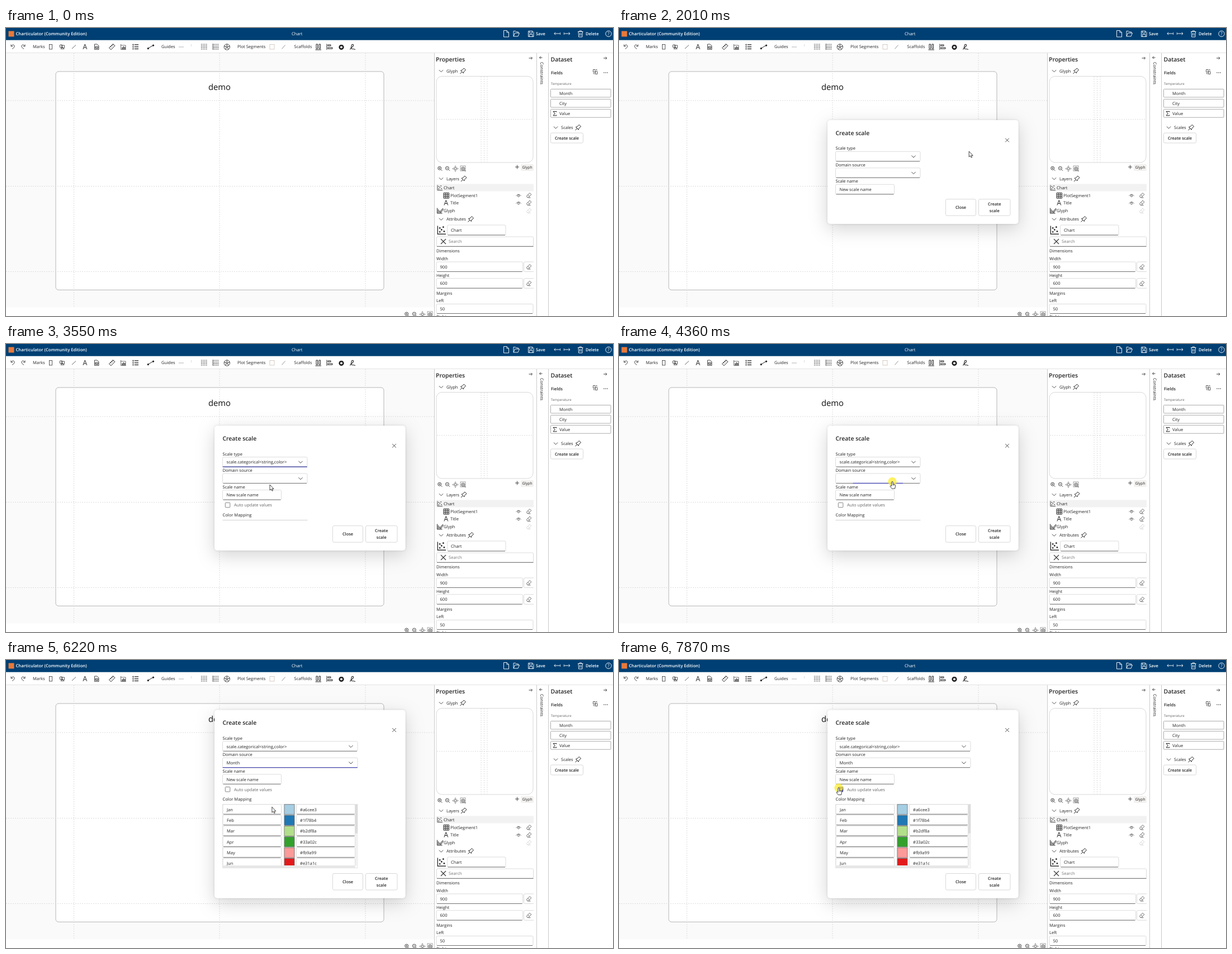
These frames come from a looping animation (1086x516 px, 8000 ms). An HTML page:

```html
<!DOCTYPE html>
<html lang="en">
<head>
<meta charset="utf-8">
<title>Chart</title>
<style>
html, body { margin: 0; width: 100%; height: 100%; overflow: hidden; background: #fff; }
svg { display: block; width: 1086px; height: 516px; font-family: "Open Sans", "Noto Sans", sans-serif; }
text { fill: #242424; white-space: pre; text-rendering: geometricPrecision; }
path, circle, rect { vector-effect: none; }
.panel { filter: drop-shadow(0 0 2px rgba(0,0,0,.13)) drop-shadow(0 9px 16px rgba(0,0,0,.17)); }
.list { filter: drop-shadow(0 0 1px rgba(0,0,0,.14)) drop-shadow(0 3px 4px rgba(0,0,0,.16)); }
</style>
</head>
<body>
<svg viewBox="0 0 1086 516"><g id="base"></g><g id="live"></g></svg>
<script>
const BLUE = '#4f52b8', INK = '#333';

// y is the middle of the capitals
const text = (x, y, s, { size = 7.55, weight = 400, fill = '#242424', anchor = 'start' } = {}) =>
  `<text x="${x}" y="${y + size * .36}" font-size="${size}" font-weight="${weight}" text-anchor="${anchor}" style="fill:${fill}">${s}</text>`;
const rect = (x, y, w, h, fill = 'none', stroke = 'none', r = 0, extra = '') =>
  `<rect x="${x}" y="${y}" width="${w}" height="${h}" rx="${r}" fill="${fill}" stroke="${stroke}" stroke-width=".8" ${extra}/>`;
const path = (d, stroke = INK, w = .9, fill = 'none', extra = '') =>
  `<path d="${d}" stroke="${stroke}" stroke-width="${w}" fill="${fill}" ${extra}/>`;
const circle = (x, y, r, stroke = INK, fill = 'none') =>
  `<circle cx="${x}" cy="${y}" r="${r}" stroke="${stroke}" stroke-width=".9" fill="${fill}"/>`;
const at = (x, y, s) => `<g transform="translate(${x} ${y})">${s}</g>`;
const seq = (n, f) => Array.from({ length: n }, (_, i) => f(i)).join('');
const dashed = d => path(d, '#d9d9d9', .9, 'none', 'stroke-dasharray="2 2"');

const field = (x, y, w, h = 17.5) =>
  rect(x, y, w, h, '#fff', '#d4d4d4', 2) + path(`M${x + 1} ${y + h}h${w - 2}`, '#666', .9);
const chevron = (x, y, w = 3.6) => path(`M${x - w} ${y - w / 2}l${w} ${w}l${w} ${-w}`);
const cross = (x, y, r, w = .9) => path(`M${x - r} ${y - r}l${2 * r} ${2 * r}m0 ${-2 * r}l${-2 * r} ${2 * r}`, INK, w);
const arrow = (x, y, dir, len = 6, color = INK) =>
  path(`M${x - dir * len / 2} ${y}h${dir * len}m${-dir * 2.3} -2.3l${dir * 2.3} 2.3l${-dir * 2.3} 2.3`, color);
const pin = (x, y) => at(x, y, path('M-5 5l3.4-3.4M-4-.8l4.8 4.8L1.6 1.3L5-1.8L1.8-5L-1.3-1.6z', '#222', 1));
const eraser = (x, y, color = '#444') =>
  at(x, y, path('M-4 1L1.5-4.5L4.3-1.7L-1 3.8h-1.7zM-2-1l3.2 3M-1 4h4', color, .8));
const eye = (x, y) => path(`M${x - 4.5} ${y + 1}q4.5-6 9 0`, '#555', .8) + circle(x, y + .8, 1.7, '#555');
const lens = (x, y, mark) => circle(x - .8, y - .8, 3) + path(`M${x + 1.5} ${y + 1.5}l2.5 2.5M${x - 2.3} ${y - .8}h3${mark}`, INK, .8);
const zoomBar = (x, y) => lens(x, y, 'm-1.5-1.5v3') + lens(x + 13.7, y, '') +
  at(x + 27.5, y, circle(0, 0, 2.2) + path('M-3.5-1.5L-5 0l1.5 1.5M3.5-1.5L5 0L3.5 1.5M-1.5-3.5L0-5l1.5 1.5M-1.5 3.5L0 5l1.5-1.5', INK, .7)) +
  rect(x + 36.5, y - 5, 9, 9, 'none', '#888') + lens(x + 42, y + 1, 'm-1.5-1.5v3');
const scatter = (x, y, s) => at(x, y, `<g transform="scale(${s})">` + path('M.5 0v9.5h9.5') +
  [[3, 2.5], [7, 1.5], [5, 4.5], [3, 7], [8, 6.5]].map(p => circle(...p, .5, INK, INK)).join('') + '</g>');
const letterA = (x, y) => path(`M${x - 3.4} ${y + 4.5}l3.4-9l3.4 9m-1.2-3h-4.4`, '#222', 1);
const section = (x, y, label, pinX) => chevron(x, y) + text(x + 9.5, y, label) + pin(pinX, y);
const button = (x, y, w, h, lines, fill = '#fff') => rect(x, y, w, h, fill, '#cfcfcf', 2.5) +
  lines.map((s, i) => text(x + w / 2, y + h / 2 + (i - (lines.length - 1) / 2) * 11.6, s, { size: 7.4, weight: 600, anchor: 'middle' })).join('');

function header() {
  const W = { fill: '#fff' }, B = { fill: '#fff', weight: 600, size: 7.5 };
  return rect(0, 0, 1086, 21.7, '#003f73') + rect(4.5, 5.5, 10, 10, '#e8793a') +
    text(17.5, 10.5, 'Charticulator (Community Edition)', { ...B, size: 7.7 }) + text(511, 10.5, 'Chart', W) +
    path('M890.5 4.5h5.5l3.5 3.5v8h-9zM896 4.5v3.5h3.5M908 15V5.5h3.5l1.5 1.5h3.5v2M908 15l2.5-6h8l-2.5 6z' +
      'M934.5 5.5h7.5l2 2v8h-9.5zM936.5 5.5v3.5h5v-3.5M936.5 15.5v-4h5.5v4' +
      'M1023 6.5h9.5M1026 6.5v-1.5h3.5v1.5M1024 6.5l.6 9.5h6.3l.6-9.5M1026.5 9v4.5M1029 9v4.5', '#fff', .9) +
    text(948, 10.5, 'Save', B) + text(1037, 10.5, 'Delete', B) +
    arrow(985.8, 10, -1, 10, '#fff') + arrow(1004, 10, 1, 10, '#fff') + path('M991.5 8v4M998.3 8v4', '#fff', .8) +
    circle(1078, 10.3, 5.2, '#fff') + text(1078, 10.3, '?', { fill: '#fff', anchor: 'middle', size: 8 });
}

function toolbar() {
  const y = 33.5;
  return text(48, y, 'Marks') + text(278, y, 'Guides') + text(414, y, 'Plot Segments') + text(515.5, y, 'Scaffolds') +
    path('M9 29.5v3.3h3.3M9.3 32.5q3-4 5.3-1.5q2 3-3.5 6.5M34 29.5v3.3h-3.3M33.7 32.5q-3-4-5.3-1.5q-2 3 3.5 6.5') +
    rect(77.5, 29.5, 5, 8.5, 'none', INK) +
    circle(98.5, 32.5, 2.7) + path('M99 31h5.5v4.5h-5.5zM98 37.5l3-3.5l3 3.5z', INK, .8) +
    path('M118 37l7-6.5', '#555') + letterA(141.3, y) +
    path('M158.5 29h4.5l3 3v6.5h-7.5zM160 33h4.5v3.5h-4.5zM160 36l2-1.5l2 2') +
    path('M184.5 35.5l7-7l3.3 3.3l-7 7zM187 33l1.5 1.5M189 31l1.5 1.5M190.7 29.3l1.3 1.3', '#222', 1) +
    path('M205.5 29v9.5h9M205.5 31h8.5v7.5', INK, .7) + path('M208 38v-3.5M210.3 38v-5M212.6 38v-4', INK, 1.5) +
    seq(3, i => circle(227.5, 30 + i * 3.7, 1) + path(`M230 ${30 + i * 3.7}h7`, '#222', 1.3)) +
    path('M254.5 36.5q4-3 9-5.5', '#222', 1) + circle(254.2, 36.7, 1.2, '#222', '#222') + circle(263.5, 31.2, 1.2, '#222', '#222') +
    path('M309 34h9', '#aaa') + path('M331.5 29v4', '#ccc', .7) +
    seq(4, i => path(`M${349.8 + i * 3} 28.5v10.5`, INK, 1.1, 'none', 'stroke-dasharray="1.6 1.2"')) +
    path('M370 28v11', INK, .8) + seq(4, i => path(`M371 ${29.3 + i * 2.9}h9.5`, INK, 1.1, 'none', 'stroke-dasharray="1.6 1"')) +
    circle(395.3, 34, 5.2) + circle(395.3, 34, 1.5) + seq(5, i => path('M395.3 32.5v-3.7', INK, .9, 'none', `transform="rotate(${i * 72} 395.3 34)"`)) +
    rect(472, 29.5, 8, 8.5, '#fff', '#cdbfb4') + path('M493.5 37.5l6-7', '#888') +
    path('M553.5 39h10.5M555 37v-8h2.6v8zM560 37v-8h2.6v8zM574 28.5v10.5M576 30h5v2h-5zM576 35h8v2.2h-8z', '#222', 1) +
    circle(600, 34.4, 4, '#222') + seq(6, i => path('M598 30.2h4l-1 2h-2z', 'none', 0, '#222', `transform="rotate(${i * 60} 600 34.4)"`)) + `<circle cx="600" cy="34.4" r="3.2" fill="none" stroke="#222" stroke-width="2.2"/>` +
    path('M615.5 38.5q2-2 2.5-6q.5-4 3-3q2 1.500-2 5q-2.500 3 .5 3t5.500 1', '#222', 1.1) +
    path('M0 44.5H1086', '#dcdcdc', .8);
}

const stage = () => rect(0, 45, 766, 455.5, '#fafafa') + rect(89, 78, 587, 391.3, '#fff', '#a2a2a2', 5) +
  [121.5, 382, 643].map(x => dashed(`M${x} 45V500`)).join('') +
  [130, 283.5, 436.5].map(y => dashed(`M0 ${y}H766`)).join('') +
  text(382, 106, 'demo', { size: 14.8, anchor: 'middle', fill: '#111' }) + zoomBar(717.5, 513);

function properties() {
  const head = { size: 10.4, weight: 600 };
  return rect(766.5, 45, 319.5, 471, '#fff') + path('M766.5 45V516M949.5 45V516M970.5 45V516', '#c4c4c4', .9) +
    text(769, 56, 'Properties', head) + arrow(938.5, 54, 1) + section(778.5, 77, 'Glyph', 817.5) +
    rect(770, 86.5, 173, 154.500, '#fff', '#cfcfcf', 10) +
    [850, 855.5, 861].map(x => dashed(`M${x} 87V240`)).join('') + dashed('M771 163.700H943') +
    zoomBar(776.5, 252) + path('M911 249h7m-3.500-3.500v7') + rect(921, 244, 23, 12, '#f3f1ef', 'none', 2) +
    text(932.500, 250, 'Glyph', { size: 6.7, anchor: 'middle' }) +
    section(778.5, 270, 'Layers', 819) + rect(770, 279.5, 174, 13, '#f2f2f2') +
    scatter(771.5, 281.5, .95) + text(783, 286.500, 'Chart') +
    path('M783 295.500h9.500v9.500h-9.500zM783 298.700h9.500M783 301.900h9.500M786.200 295.500v9.500M789.400 295.500v9.500', '#222', 1) +
    text(795, 300, 'PlotSegment1') + letterA(787.3, 313) + text(795, 313.500, 'Title') +
    [300, 313.500].map(y => eye(917, y) + eraser(935.500, y)).join('') +
    path('M771.500 322.500v9.500h9M773.500 331v-6M775.700 331v-4M777.500 331l-.3-2.500l4-5l1.300 1l-4 5.500z', '#222', 1) +
    text(783, 327.500, 'Glyph') + eraser(935.500, 327.500, '#ccc') +
    section(778.5, 342.500, 'Attributes', 831.5) + scatter(771.5, 354.500, 1.55) +
    field(789.5, 353, 104.5, 18) + text(796, 362, 'Chart') +
    rect(770.5, 374, 173, 17.500, '#fff', '#d4d4d4', 2) + path('M771 391.300h172.500', '#666', 1) + cross(782.500, 382.500, 4.500, 1.1) +
    text(792, 382.500, 'Search', { fill: '#777' }) + text(770, 399.700, 'Dimensions') +
    text(770, 413.3, 'Width') + text(770, 443, 'Height') +
    [['900', 419], ['600', 448.700]].map(([s, y]) => field(770, y, 154.500) + text(776.500, y + 9, s) +
      path(`M944 ${y}h-15.500q-2 0-2 2v13.500q0 2 2 2h15.500`, '#d0d0d0', .8) + eraser(935.500, y + 9)).join('') +
    text(770, 475, 'Margins') + text(770, 488.500, 'Left') + field(770, 494.500, 173, 17) + text(776.500, 503.200, '50') + text(770, 517.500, 'Right') +
    arrow(957, 53, -1, 5) + `<g transform="translate(959 61) rotate(90)">${text(0, 0, 'Constraints')}</g>` +
    text(974.500, 56, 'Dataset', head) + arrow(1072, 54, 1) + text(975, 80, 'Fields', { size: 7.5, weight: 600 }) +
    path('M1050.500 74.500h3.500v4.500h-3.500zM1054.500 78h3.500v4.500h-3.500zM1055.500 74.500h1.500v2M1051.500 80.500v1.500h2', INK, .8) +
    [1070, 1073, 1076].map(x => circle(x, 80, .4)).join('') +
    text(975, 100, 'Temperature', { size: 6.1, fill: '#666' }) +
    ['Month', 'City', 'Value'].map((s, i) => rect(974.500, 109.500 + i * 18.100, 107.500, 14.500, '#fff', '#999', 1) + text(990, 117 + i * 18.100, s)).join('') +
    path('M985 150.700v-1.200h-6l3.200 3.700l-3.200 3.700h6v-1.200', '#222', 1) + section(983.500, 178.300, 'Scales', 1023.500);
}

const SCALES = ['categorical<string,color', 'categorical<string,image', 'categorical<date,color', 'categorical<string,boolean',
  'categorical<string,number', 'categorical<string,enum', 'linear<number,number', 'linear<number,color', 'linear<number,boolean']
  .map(s => `scale.${s}>`.replace('<', '&lt;'));
const MONTHS = [['Jan', '#a6cee3'], ['Feb', '#1f78b4'], ['Mar', '#b2df8a'], ['Apr', '#33a02c'], ['May', '#fb9a99'], ['Jun', '#e31a1c']];

const select = (y, w, value, focus) => field(387.5, y, w) + text(394.5, y + 9, value, { size: 7.7 }) + chevron(375.5 + w, y + 9) +
  (focus > 0 ? path(`M${387.5 + w * (1 - focus) / 2} ${y + 17.500}h${w * focus}`, BLUE, 1.3) : '');

const menu = (top, items, firstFill) => rect(387.5, top, 152, 4.300 + 19.300 * items.length, '#fff', 'none', 2, 'class="list"') +
  rect(390, top + 2.500, 147, 18.600, firstFill, 'none', 1.500) +
  items.map((s, i) => text(405.5, top + 12 + i * 19.300, s, { size: s.length > 8 ? 7.7 : 7.55 })).join('');

const mapping = () => rect(387.5, 169, 241.500, 114.300, '#fafafa', '#e3e3e3') +
  '<clipPath id="clip"><rect x="387" y="168" width="238" height="110.500"/></clipPath><g clip-path="url(#clip)">' +
  MONTHS.map(([name, color], i) => {
    const y = 169.300 + i * 19.350;
    return field(388, y, 104.500) + text(395, y + 9, name) + rect(498, y, 18, 18, color, '#666') +
      field(519.500, y, 105) + text(526, y + 9, color);
  }).join('') + '</g>' + rect(624.800, 169, 4.200, 109.500, '#f1f1f1') + rect(624.800, 169, 4.200, 52, '#dcdcdc') +
  rect(388, 278.700, 236.500, 4.300, '#e6e6e6');

const ramp = (t, from, len) => Math.min(1, Math.max(0, (t - from) / len));

function dialog(t) {
  if (t < 1665) return '';
  const stepB = t >= 3430, stepC = t >= 5750;
  const [top, h, w] = stepC ? [89.500, 337.300, 241.500] : stepB ? [146.300, 223.700, 151.500] : [165, 186, 151.500];
  const ease = 1 - (1 - ramp(t, 1585, 250)) ** 3, s = .85 + .15 * ease;
  const typeFocus = t < 4290 ? ramp(t, 2470, 120) : 0;
  const domainFocus = t < 7190 ? ramp(t, 4290, 120) : 0;
  let g = rect(373, 0, 341.700, h, '#fff', 'none', 5, 'class="panel"') +
    text(387.5, 23, 'Create scale', { size: 10.4, weight: 600 }) + cross(694.500, 36, 3.300) +
    text(387.5, 50.500, 'Scale type') + select(56.300, w, stepB ? SCALES[0] : '', typeFocus) +
    text(387.5, 80, 'Domain source') + select(85.700, w, stepC ? 'Month' : '', domainFocus) +
    text(387.5, 109.500, 'Scale name') + field(387.5, 115.300, 105) + text(394.500, 124.300, 'New scale name') +
    button(584.500, h - 44.300, 54, 29.500, ['Close']) + button(643.500, h - 44.300, 56.500, 29.500, ['Create', 'scale']);
  if (stepB) {
    const on = t >= 7320;
    g += rect(392.300, 138, 8.500, 8.500, on ? '#444791' : '#fff', on ? '#444791' : '#666', 1) +
      (on ? path('M394 142.400l2 2l3.500-4', '#fff', 1) : '') +
      text(408, 142.300, 'Auto update values', { fill: '#666' }) + text(387.5, 159.700, 'Color Mapping') +
      (stepC ? mapping() : path('M387.500 169.300h152', '#ccc', .9));
  }
  if (t >= 2540 && !stepB) g += menu(75, SCALES, t >= 3300 ? '#dfdfdf' : t >= 2900 ? '#f5f5f5' : 'none');
  if (t >= 4430 && !stepC) g += menu(104.200, ['Month', 'City', 'Value'], t >= 5560 ? '#dfdfdf' : '#f5f5f5');
  return `<g opacity="${ease}" transform="translate(544 258) scale(${s}) translate(-544 -258) translate(0 ${top})">${g}</g>`;
}

const POINTERS = {
  arrow: path('M0 0V10L2.300 8L4 11.300L5.500 10.600L4 7.500H7z', '#111', .8, '#fff'),
  hand: path('M-1.200 1.300Q-1.200 0 0 0Q1.200 0 1.200 1.300V4.800L4.500 5.600Q5.800 6 5.600 7.600L4.600 12.600H-.8L-3.800 8.800Q-4 7 -2.600 7.200L-1.200 8.300z', '#111', .8, '#fff') +
    path('M1.200 5v2M3 5.500v1.800', '#111', .6),
  beam: path('M-3-7h2.300L0-6.300L.7-7H3M0-6.500V7M-3 7.500h2.300L0 6.800L.7 7.500H3', '#111', 1.500)
};
// time, x, y, pointer used from then on
const TRACK = [
  [110, 1056, 505, 'arrow'], [180, 1048, 490, 'arrow'], [840, 1048, 490, 'arrow'], [1200, 1003, 335, 'arrow'],
  [1430, 969, 212, 'arrow'], [1500, 977, 200, 'hand'], [1600, 983, 196, 'hand'], [1710, 983, 196, 'arrow'],
  [2120, 497, 230, 'hand'], [2200, 487, 233, 'hand'], [2780, 487, 233, 'beam'], [2950, 472, 252, 'beam'],
  [3430, 472, 252, 'arrow'], [4020, 472, 252, 'hand'], [4230, 489, 246.500, 'hand'], [4830, 489, 246.500, 'beam'],
  [5230, 476, 263, 'beam'], [6220, 476, 263, 'arrow'], [6480, 446, 339, 'arrow'], [6760, 413, 240, 'arrow'],
  [6910, 404, 248, 'arrow'], [6980, 400, 257, 'arrow'], [7050, 400, 257, 'arrow'], [7200, 393, 229, 'hand'], [8000, 393, 229, 'hand']
];
const CLICKS = [[1530, 1660], [2480, 2600], [3300, 3430], [4290, 4440], [5560, 5680], [7250, 7390], [7860, 8000]];

function pointer(t) {
  if (t < TRACK[0][0]) return '';
  const i = TRACK.findIndex((k, n) => n && t < k[0]);
  const [t0, x0, y0, kind] = TRACK[i - 1], [t1, x1, y1] = TRACK[i];
  const k = (t - t0) / (t1 - t0);
  const lit = CLICKS.some(([a, b]) => t >= a && t < b);
  return at(x0 + (x1 - x0) * k, y0 + (y1 - y0) * k,
    (lit ? '<circle r="7.700" fill="#ffec2e" opacity=".75"/>' : '') + POINTERS[kind]);
}

const base = document.getElementById('base'), live = document.getElementById('live');
base.innerHTML = stage() + properties() + toolbar() + header();

function draw() {
  const t = performance.now() % 8000;
  const hover = t > 1480 && t < 1740;
  live.innerHTML = button(974.500, 188, 58, 18, ['Create scale'], hover ? '#f3f3f3' : '#fff') + dialog(t) + pointer(t);
  requestAnimationFrame(draw);
}
draw();
</script>
</body>
</html>
```
